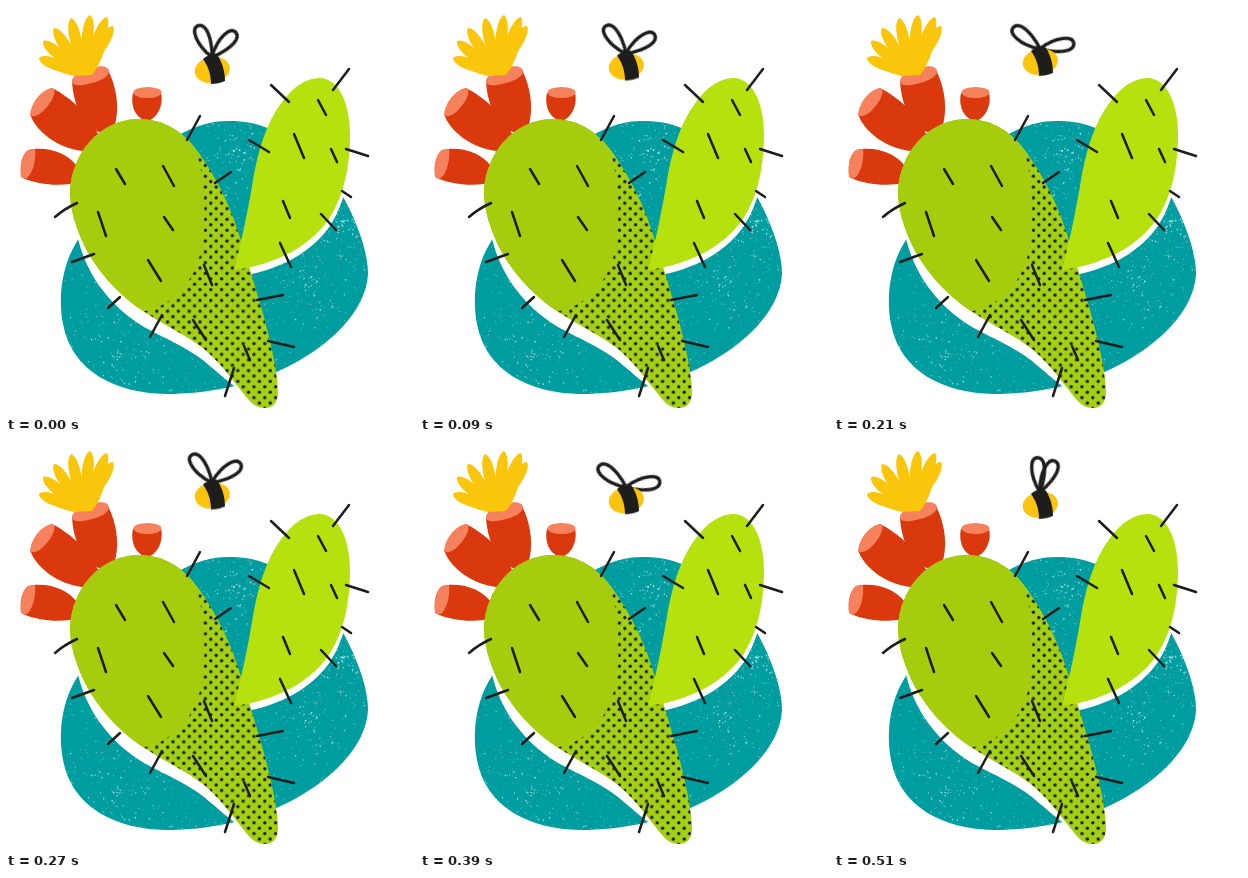
Recreate the animation shown at these times as an HTML page. Size 408 px wide and 408 px high, loop 0.54 s.

```html
<!DOCTYPE html>
<html lang="en">
<head>
<meta charset="utf-8">
<title>Cactus and bee</title>
<style>
  html, body { margin: 0; width: 100%; height: 100%; overflow: hidden; background: #fff; }
  svg { display: block; width: 100vw; height: 100vh; }
  .ink { fill: none; stroke: #1d1d1b; stroke-linecap: round; stroke-linejoin: round; }
  .red { fill: #d9390d; }
  .pink { fill: #f5825c; }
  .bee { animation: bob 540ms steps(9) infinite; }
  .left, .right { animation: flap-left 180ms step-end infinite; }
  .right { animation-name: flap-right; }
  @keyframes bob {
    0%, 100% { transform: translateY(0); }
    50% { transform: translateY(-10.5px); }
  }
  @keyframes flap-left {
    0% { transform: rotate(-24deg); }
    16.667% { transform: rotate(-51deg); }
    33.333% { transform: rotate(-43deg); }
    50% { transform: rotate(-36deg); }
    66.667% { transform: rotate(-20deg); }
    83.333%, 100% { transform: rotate(-4deg); }
  }
  @keyframes flap-right {
    0% { transform: rotate(44deg); }
    16.667% { transform: rotate(81deg); }
    33.333% { transform: rotate(69deg); }
    50% { transform: rotate(57deg); }
    66.667% { transform: rotate(42deg); }
    83.333%, 100% { transform: rotate(27deg); }
  }
</style>
</head>
<body>
<svg viewBox="0 0 408 408">
  <defs>
    <path id="blob" d="M222 115C250 115 266 122 288 137C312 153 330 176 341 198C355 226 362 250 362 268C360 305 325 338 285 359C245 380 200 388 160 388C110 387 66 366 57 318C51 285 58 252 76 228C100 195 140 143 185 123C197 118 208 115 222 115Z"/>
    <path id="body" d="M130 113C158 112 178 126 193 147C212 174 226 203 236 238C247 273 257 305 264 335C269 357 272 374 272 388C271 398 266 402 259 402C252 402 247 399 242 393C231 380 217 359 198 343C180 329 160 320 140 307C112 289 90 264 77 237C69 218 64 203 64 185C66 148 92 115 130 113Z"/>
    <path id="arm" d="M228 264C234 240 240 215 246 180C251 147 260 117 276 96C287 81 300 72 313 72C334 72 344 100 344 128C344 160 338 190 323 213C300 245 264 259 228 264Z"/>
    <path id="wing" class="ink" stroke-width="3.4" d="M0 0C-5 -8 -8 -20 -6 -29C-4 -36 3 -36 5.500 -29C7.500 -21 4 -8 0 0Z"/>
    <pattern id="dots" width="10.8" height="10.8" patternUnits="userSpaceOnUse" patternTransform="translate(191.300 151.300)">
      <circle cx="2.700" cy="2.700" r="1.700" fill="#1d1d1b"/>
      <circle cx="8.100" cy="8.100" r="1.700" fill="#1d1d1b"/>
    </pattern>
    <clipPath id="inBlob"><use href="#blob"/></clipPath>
    <clipPath id="inBody"><use href="#body"/></clipPath>
  </defs>

  <use href="#blob" fill="#009da0"/>
  <g id="specks" clip-path="url(#inBlob)"></g>

  <use href="#arm" x="1" y="7" fill="#fff"/>
  <path fill="#fff" d="M70 222C76 262 100 298 138 321C160 333 180 341 198 355C210 365 219 373 231 382L245 380L190 310L120 200Z"/>

  <path class="red" d="M22 144C38 140 60 145 71 160C73 170 70 176 64 178C48 180 30 178 17 172C13 162 15 150 22 144Z"/>
  <path class="pink" d="M22 144L29 143C30 152 28 164 22 171Q18 174 15 171C13 160 16 149 22 144Z"/>
  <path class="red" d="M46 82C66 92 84 110 92 128C94 136 86 143 76 145C52 142 30 126 24 108Z"/>
  <path class="pink" d="M24 109C25 97 34 85 45 82C51 82 49 92 40 102C34 109 28 112 24 109Z"/>
  <path class="red" d="M66 75C67 96 74 112 87 123C97 130 108 127 110 114C113 98 110 80 102 64Z"/>
  <path class="pink" d="M66 76C65 70 75 65 86 62C95 59 102 60 103 65C103 71 93 76 82 78C74 80 67 80 66 76Z"/>
  <path class="red" d="M127 87C124 100 130 113 141 115C151 113 158 99 155 87Z"/>
  <ellipse class="pink" cx="141.500" cy="86.500" rx="14" ry="5.500"/>
  <g id="petals" fill="#f9c60b"></g>

  <use href="#body" fill="#a3cf15"/>
  <g clip-path="url(#inBody)">
    <use href="#body" fill="url(#dots)"/>
    <path fill="#a6cd0d" d="M60 100H175L192 152C197 170 199 190 198 220C197 265 174 300 134 306L60 310Z"/>
  </g>
  <use href="#arm" fill="#b5e20e"/>

  <path class="ink" stroke-width="2.500" stroke-linecap="butt" d="M343 63L327 84M265 79L283 96M312 94L320 109M288 128L298 152M243 134L263 146M340 143L362 150M325 143L331 156M336 185L345 191M277 195L284 212M315 208L330 224M274 237L285 261M194 110L181 134M225 166L209 177M110 163L119 178M157 160L168 180M92 206L100 230M158 211L167 224M71 197Q58 203 49 211M66 256L88 248M142 254L155 275M114 291L102 302M156 309L144 331M187 314L200 334M198 259L206 279M251 294L277 289M262 335L288 341M238 340L244 354M228 362L219 390"/>

  <g class="bee">
    <g transform="translate(206 51)">
      <g class="left"><use href="#wing"/></g>
      <g class="right"><use href="#wing"/></g>
    </g>
    <ellipse cx="206.300" cy="64" rx="17.700" ry="13" fill="#fcc40c" transform="rotate(-10 206 64)"/>
    <path fill="#1d1d1b" d="M197 53C201 49 208 47 212 50C217 58 219 67 219 75C215 77 210 78 205 78C205 68 202 60 197 53Z"/>
  </g>
</svg>
<script>
  const add = (id, d, attrs = {}) => {
    const path = document.createElementNS('http://www.w3.org/2000/svg', 'path');
    Object.entries({ d, ...attrs }).forEach(([k, v]) => path.setAttribute(k, v));
    document.getElementById(id).append(path);
  };

  // Leaf-shaped petals fanning out from one base point.
  const petal = (x, y) => {
    const bx = 77, by = 69, dx = x - bx, dy = y - by;
    const len = Math.hypot(dx, dy), nx = -dy / len * 8, ny = dx / len * 8;
    const at = (k, s) => `${bx + dx * k + nx * s} ${by + dy * k + ny * s}`;
    add('petals', `M${bx} ${by}C${at(.45, .9)} ${at(.92, 1)} ${x} ${y}C${at(.92, -1)} ${at(.45, -.9)} ${bx} ${by}Z`);
  };
  [[33, 52], [37, 35], [48, 22], [65, 12], [84, 9], [101, 11], [107, 20]].forEach(p => petal(...p));
  add('petals', 'M38 57Q60 47 77 42Q92 38 98 45Q94 59 86 69L68 70Q52 67 38 57Z');

  let seed = 11;
  const rnd = () => (seed = seed * 16807 % 2147483647) / 2147483647;
  const specks = (count, place, size) => {
    let d = '';
    for (let i = 0; i < count; i++) {
      const [x, y] = place(), s = size * (.4 + rnd());
      d += `M${x.toFixed(1)} ${y.toFixed(1)}h${s.toFixed(1)}l${(-s * rnd()).toFixed(1)} ${s.toFixed(1)}z`;
    }
    return d;
  };
  const anywhere = () => [56 + rnd() * 306, 115 + rnd() * 273];
  const near = (cx, cy, r) => () => {
    const a = rnd() * 2 * Math.PI, q = r * rnd();
    return [cx + q * Math.cos(a), cy + q * Math.sin(a)];
  };
  add('specks', specks(1500, anywhere, 1.3), { fill: '#55bfc0' });
  add('specks', specks(300, anywhere, 1.3), { fill: '#a9dedd' });
  [[335, 215, 28], [310, 275, 45], [232, 150, 45], [110, 350, 50]].forEach(c =>
    add('specks', specks(70, near(...c), 1.5), { fill: '#b5e2e1' }));
</script>
</body>
</html>
```
